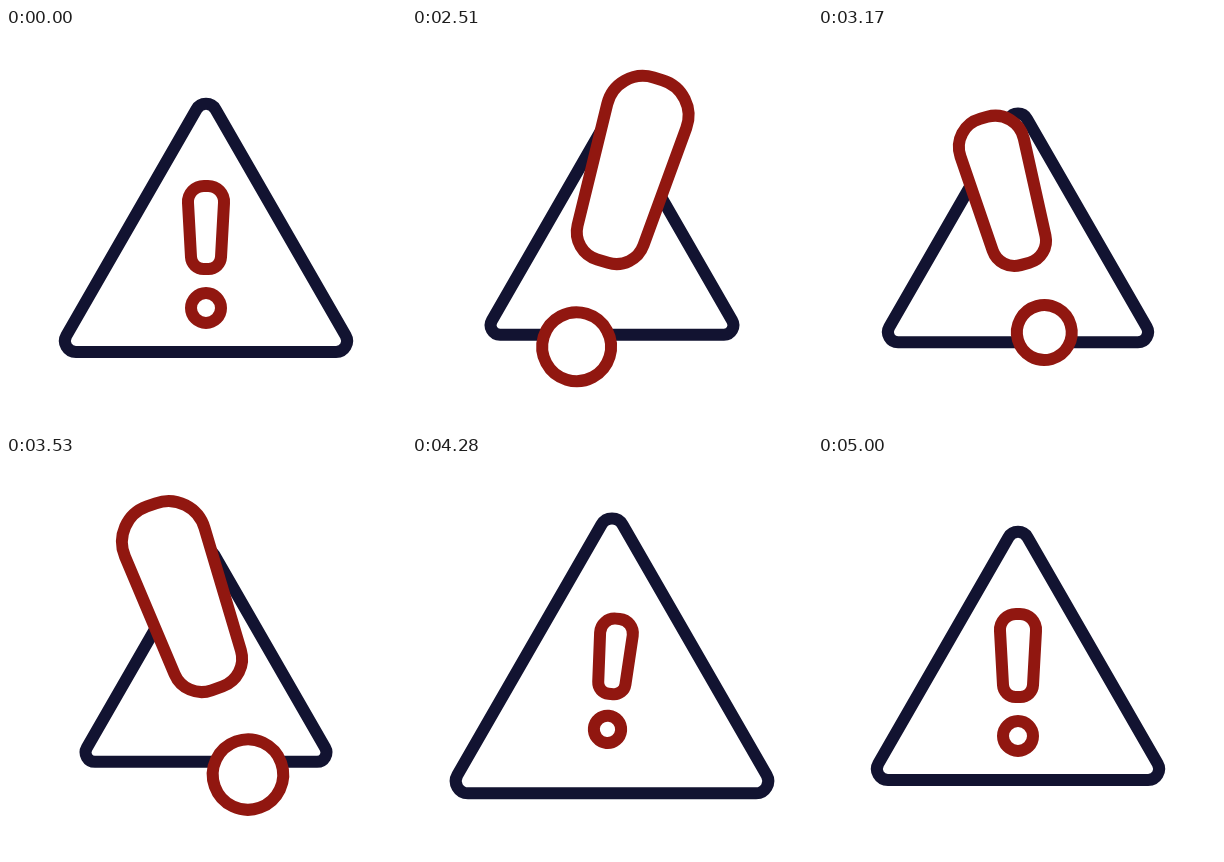
An HTML page that plays this animation: 400x400 px, repeating every 5030 ms.

```html
<!DOCTYPE html>
<html>
<head>
<meta charset="utf-8">
<style>
  html, body { margin: 0; width: 100%; height: 100%; overflow: hidden; background: #fff; }
  svg { display: block; width: 400px; height: 400px; }
  path, circle { fill: #fff; stroke-width: 12; stroke-linejoin: round; vector-effect: non-scaling-stroke; }
</style>
</head>
<body>
<svg viewBox="0 0 400 400">
  <path id="sign" stroke="#121331" d="M70 324H330A11 11 0 0 0 339.6 307.5L209.6 81.5A11 11 0 0 0 190.4 81.5L60.4 307.5A11 11 0 0 0 70 324Z"/>
  <g id="mark" stroke="#911710">
    <path d="M198 158H202A16 16 0 0 1 218 174.9L215 229.2A12.5 12.5 0 0 1 202.5 241H197.5A12.5 12.5 0 0 1 185 229.2L182 174.9A16 16 0 0 1 198 158Z"/>
    <circle cx="200" cy="280" r="15"/>
  </g>
</svg>
<script>
const LOOP = 5030, START = 2030, STEP = 30, PIVOT = 227;
const sign = document.getElementById('sign');
const mark = document.getElementById('mark');

const rest = { grow: 0, tilt: 0, size: 1 };
const swing = side => ({ grow: 1.36, tilt: 19.8 * side, size: .852 });
const poses = [
  { at: 2005, ...rest },
  { at: 2425, ...swing(1) },
  { at: 3020, grow: .6, tilt: -14, size: .952 },
  { at: 3630, ...swing(-1) },
  { at: 4200, grow: -.11, tilt: 6.5, size: 1.128, rebound: true },
  { at: 4650, grow: .03, tilt: -1.5, size: .985 },
  { at: 5000, ...rest },
];

// Cubic Bezier easing with control points (.33, 0) and (x2, 1)
function ease(x, x2) {
  let lo = 0, hi = 1, u = x;
  for (let i = 0; i < 24; i++) {
    u = (lo + hi) / 2;
    const v = 1 - u;
    if (u * v * v + 3 * u * u * v * x2 + u * u * u < x) lo = u;
    else hi = u;
  }
  return u * u * (3 - 2 * u);
}

function poseAt(t) {
  const i = poses.findIndex(p => p.at > t);
  if (i < 1) return rest;
  const a = poses[i - 1], b = poses[i];
  const p = ease((t - a.at) / (b.at - a.at), b.rebound ? .6 : .2);
  // On the rebound the tilt trails the mark's size, and the sign trails both
  const mix = (key, lag) => a[key] + (b[key] - a[key]) * (b.rebound ? p ** lag : p);
  return { grow: mix('grow', 1), tilt: mix('tilt', 1.5), size: mix('size', 2) };
}

function draw(now) {
  const t = now % LOOP;
  const { grow, tilt, size } = poseAt(t < START ? 0 : t - (t - START) % STEP);
  const y = PIVOT - 19 * Math.abs(grow);
  sign.setAttribute('transform',
    `translate(200 200) scale(${size}) translate(-200 -200)`);
  mark.setAttribute('transform',
    `translate(200 ${y}) rotate(${tilt}) scale(${1 + grow}) translate(-200 ${-PIVOT})`);
}

const begin = performance.now();
function tick() {
  draw(performance.now() - begin);
  requestAnimationFrame(tick);
}
tick();
</script>
</body>
</html>
```
